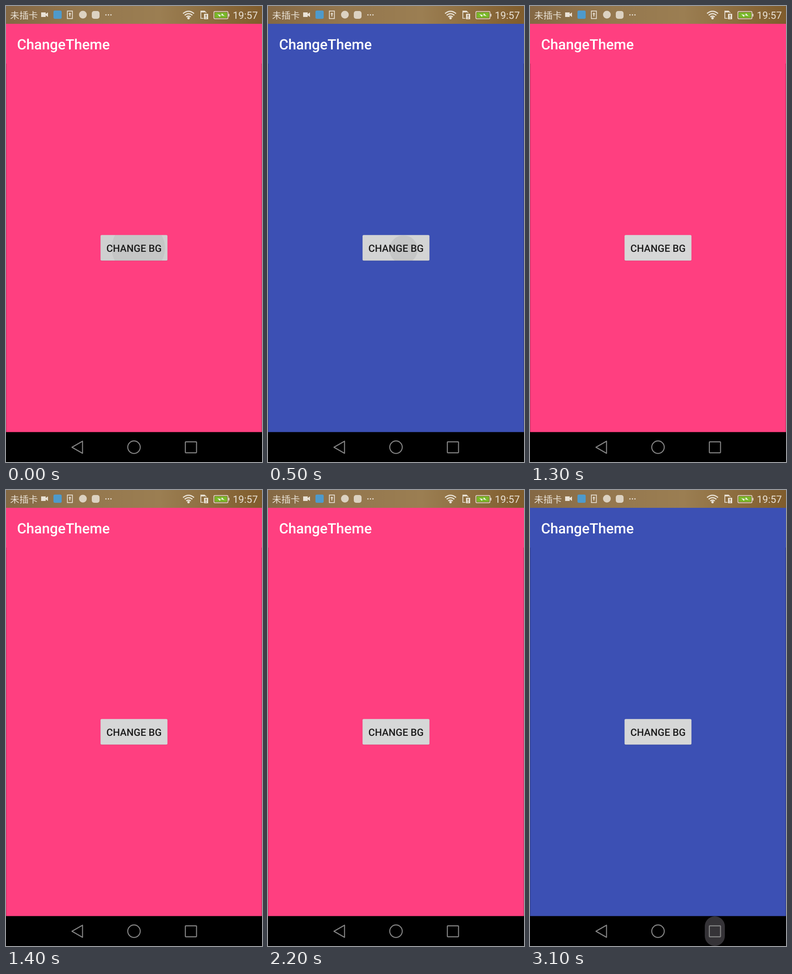
Animation of 561 by 998 pixels, one loop 3.3 s. Source, as an HTML page:

```html
<!DOCTYPE html>
<html lang="en">
<head>
<meta charset="utf-8">
<title>Theme switch</title>
<style>
html, body { margin: 0; width: 100%; height: 100%; overflow: hidden; background: #000; }
svg { display: block; width: 561px; height: 998px; font-family: Roboto, sans-serif; text-rendering: geometricPrecision; }
</style>
</head>
<body>
<svg viewBox="0 0 561 998">
  <defs>
    <linearGradient id="wall">
      <stop offset="0" stop-color="#846844"/>
      <stop offset=".3" stop-color="#94774e"/>
      <stop offset=".6" stop-color="#9b7e52"/>
      <stop offset="1" stop-color="#7f5c2c"/>
    </linearGradient>
    <clipPath id="clip"><rect x="207.2" y="501.2" width="146.6" height="56" rx="2.5"/></clipPath>
  </defs>

  <rect id="page" y="39" width="561" height="894"/>
  <path d="M.75 126V933M560.25 126V933" stroke="#000" stroke-opacity=".18" stroke-width="1.5"/>
  <text x="24.2" y="94.8" font-size="31.2" font-weight="500" fill="#fff">ChangeTheme</text>

  <!-- status bar -->
  <rect width="561" height="39" fill="url(#wall)"/>
  <g fill="#e9e2d6">
    <text x="9" y="28" font-size="20.3" style="font-family:'Noto Sans CJK SC','Noto Sans CJK',sans-serif">未插卡</text>
    <path d="M77 14h10v3.5l5-3.5v10l-5-3.5V24H77z"/>
    <rect x="104" y="10" width="18" height="18" rx="3" fill="#4e9acb"/>
    <path d="M140 14l3 4h-2v5h-2v-5h-2z"/>
    <circle cx="168.5" cy="19" r="8.5" opacity=".85"/>
    <rect x="188" y="11" width="17" height="17" rx="5" opacity=".85"/>
    <circle cx="219" cy="19.5" r="1.4"/><circle cx="224.5" cy="19.5" r="1.4"/><circle cx="230" cy="19.5" r="1.4"/>
    <circle cx="400" cy="26.5" r="2.7"/>
    <path fill-rule="evenodd" d="M434 17h9v12h-9zM437.5 19v5h2v-5zM437.5 25.5v2h2v-2z"/>
    <text x="497" y="28" font-size="22">19:57</text>
  </g>
  <g fill="none" stroke="#e9e2d6">
    <rect x="134.5" y="11" width="11" height="16.5" stroke-width="1.7"/>
    <path d="M388 16.5q12-10 24 0M391.500 20.300q8.500-7 17 0M395 24q5-4 10 0" stroke-width="2.500"/>
    <path d="M433 27h-6V11h8l4 4" stroke-width="1.7"/>
    <path d="M427 12.500h9" stroke-width="3"/>
    <rect x="455.500" y="12" width="31" height="16" rx="2.500" stroke-width="1.500"/>
    <path d="M488.500 17v6" stroke-width="2"/>
  </g>
  <rect x="457.500" y="14" width="27" height="12" fill="#78b829"/>
  <path d="M463 18l9 2 1-4 6 6-9-2-1 4z" fill="#f3f3e8"/>

  <!-- button -->
  <rect x="207.2" y="502.2" width="146.600" height="56" rx="2.500" opacity=".13"/>
  <rect x="207.2" y="501.2" width="146.600" height="56" rx="2.500" fill="#d6d7d7"/>
  <g clip-path="url(#clip)">
    <rect id="shade" x="207" y="501" width="147" height="57"/>
    <circle id="wave"/>
  </g>
  <text x="280.500" y="537.500" font-size="21.800" font-weight="500" text-anchor="middle" fill="#1c1c1c">CHANGE BG</text>

  <!-- navigation bar -->
  <rect y="932.5" width="561" height="65.5"/>
  <rect id="pill" y="933" height="65" fill="#353337"/>
  <g fill="none" stroke="#858585" stroke-width="2.200" stroke-linejoin="round">
    <path d="M144.500 965.700L167.700 952.500V979z"/>
    <circle cx="280.500" cy="965.600" r="13.700"/>
    <rect x="393" y="953.800" width="24.500" height="24" rx="1"/>
  </g>
</svg>
<script>
const LOOP = 3300, STEP = 100;
const PINK = '#ff3f80', BLUE = '#3c50b4';
// press: finger down, at: theme switch, x/y: touch point
const taps = [
  { press: -220, at: 0, x: 290, y: 530, color: PINK },
  { press: 400, at: 500, x: 297, y: 533, color: BLUE },
  { press: 800, at: 900, x: 293, y: 531, color: PINK },
  { press: 1430, at: 1500, x: 293, y: 531, color: BLUE },
  { press: 1750, at: 1900, x: 292, y: 531, color: PINK },
  { press: 2140, at: 2300, x: 290, y: 530, color: BLUE }
];

const el = id => document.getElementById(id);
const set = (id, attrs) => {
  for (const name in attrs) el(id).setAttribute(name, attrs[name]);
};
const ramp = (v, from, to) => Math.min(1, Math.max(0, (v - from) / (to - from)));

function draw(t) {
  const tap = taps.filter(p => p.at <= t).pop();
  const age = t - tap.press;
  const out = 1 - ramp(age, 370, 430);
  const fade = 1 - .9 * ramp(age, 150, 370);
  set('page', { fill: tap.color });
  set('shade', { opacity: .03 * ramp(age, 30, 160) * out });
  set('wave', { cx: tap.x, cy: tap.y, r: 95 * (1 - Math.exp(-age / 200)) ** 1.2, opacity: .065 * fade * out });

  const grow = ramp(t, 2900, 3100), width = 44 * grow;
  set('pill', { x: 405 - width / 2, width, rx: width / 2, opacity: grow });
}

const start = performance.now();
function tick() {
  const t = (performance.now() - start) % LOOP;
  draw(Math.floor(t / STEP) * STEP);
  requestAnimationFrame(tick);
}
tick();
</script>
</body>
</html>
```
